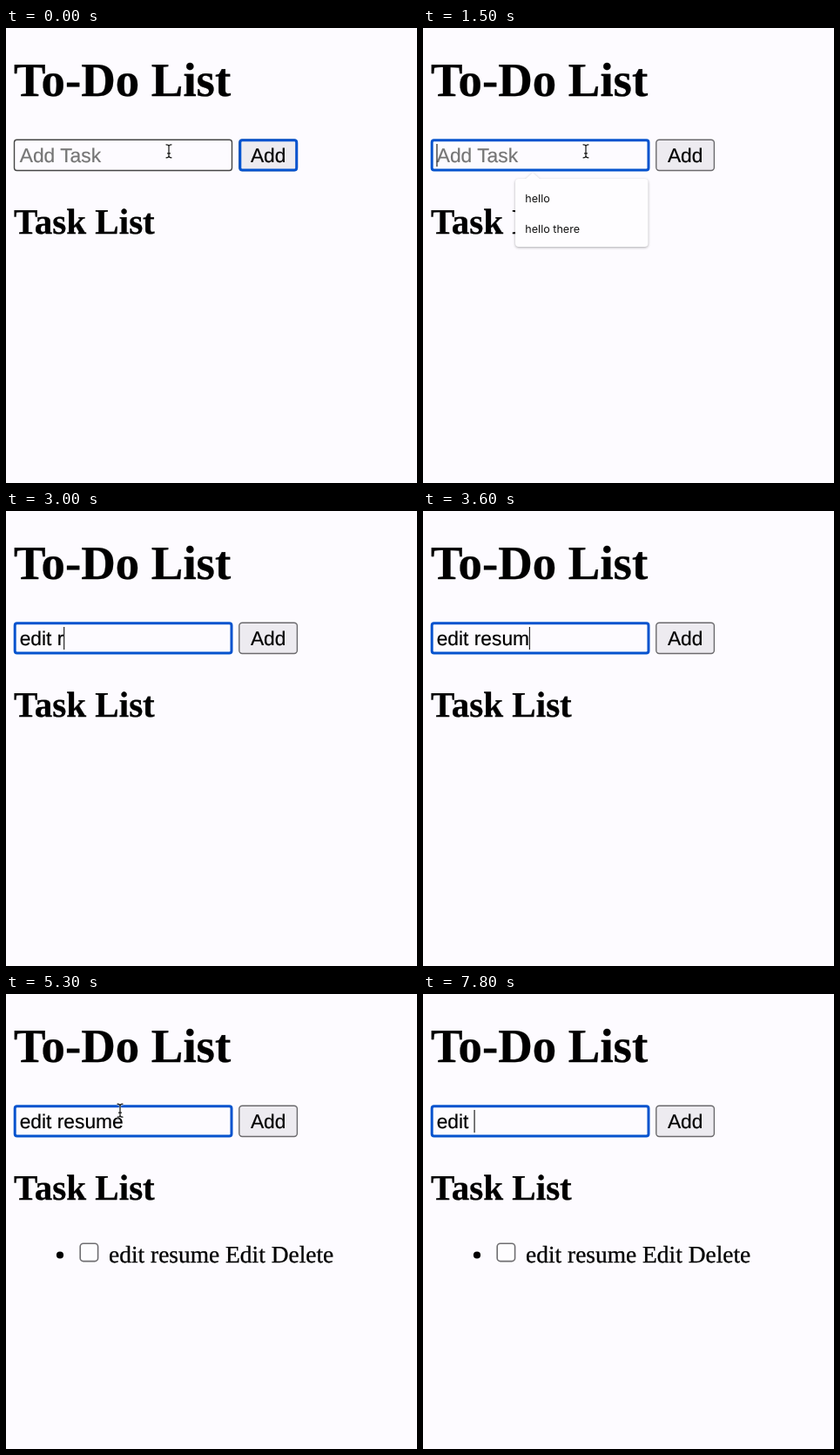
These frames come from a looping animation (472 px wide and 522 px high, 8 s). An HTML page:

```html
<!DOCTYPE html>
<html lang="en">
<head>
<meta charset="utf-8">
<title>To-Do List</title>
<style>
  html, body { margin: 0; width: 100%; height: 100%; overflow: hidden; background: #fdfbff; }
  svg { display: block; width: 100%; height: 100%; }
  text { white-space: pre; text-rendering: geometricPrecision; }
  .serif { font-family: "Liberation Serif", serif; stroke: #000; stroke-width: .3; }
  .sans { font: 22.8px "Liberation Sans", sans-serif; stroke: currentColor; stroke-width: .2; }
  .menu { font: 12.6px Inter, sans-serif; fill: #111; }
  .bold { font-weight: bold; }
  .ring { fill: none; stroke: #0553ce; stroke-width: 3; }
  #placeholder { color: #757575; fill: #757575; }
  #popup path { fill: #fefdff; filter: drop-shadow(0 1px 1.5px rgba(0, 0, 0, .32)); }
  #pointer { fill: none; stroke-linecap: round; }
</style>
</head>
<body>
<svg viewBox="0 0 472 522">
  <defs>
    <path id="beam" d="M-3-7.5Q0-7.5 0-5.5Q0-7.5 3-7.5M0-5.5V5.5M-3 7.5Q0 7.5 0 5.5Q0 7.5 3 7.5M-1.5 2.5H1.5"/>
  </defs>

  <text class="serif bold" x="9" y="77.7" font-size="54.8">To-Do List</text>
  <text class="serif bold" x="9" y="236" font-size="41.1">Task List</text>

  <rect id="inputBorder" x="9.5" y="128.2" width="250" height="35.3" rx="3" fill="none" stroke="#454545" stroke-width="1.4"/>
  <rect id="inputRing" class="ring" x="10.2" y="128.8" width="248.8" height="34.3" rx="2.5"/>
  <text id="placeholder" class="sans" x="15.7" y="154">Add Task</text>
  <text id="value" class="sans" x="15.7" y="154"></text>
  <rect id="caret" y="133" width="1.2" height="26" fill="#222"/>

  <rect x="267.8" y="128.2" width="66.6" height="35.3" rx="3.5" fill="#edebf0" stroke="#6b6a6d" stroke-width="1.4"/>
  <rect id="buttonRing" class="ring" x="268.8" y="128.8" width="64.9" height="34.3" rx="2.5"/>
  <text class="sans" x="301.2" y="154" text-anchor="middle">Add</text>

  <g id="item">
    <circle cx="62" cy="299.5" r="4.1"/>
    <rect x="85.2" y="286.2" width="20.4" height="20.4" rx="3.6" fill="#fefdff" stroke="#6f6e71" stroke-width="1.6"/>
    <text class="serif" x="118" y="308" font-size="27.45">edit resume Edit Delete</text>
  </g>

  <g id="popup">
    <path d="M110 173H118L126 166L134 173H254.5a4 4 0 0 1 4 4V247a4 4 0 0 1-4 4H110a4 4 0 0 1-4-4V177a4 4 0 0 1 4-4Z"/>
    <text class="menu" x="117.3" y="199.7">hello</text>
    <text class="menu" x="117.3" y="234.7">hello there</text>
  </g>

  <g id="pointer">
    <use href="#beam" stroke="#fff" stroke-width="2.4" opacity=".7"/>
    <use href="#beam" stroke="#111" stroke-width="1.2"/>
  </g>
</svg>
<script>
const LOOP = 8000, STEP = 100, BLINK = 500;
const FOCUS = 500, TYPING = 1600, ADDED = 4400, POINTER_BACK = 4800, DELETING = 7200;
const TASK = "edit resume", INPUT_X = 15.7;

// Evenly paced runs of key presses
const bursts = [
  { start: 1630, pace: 133, keys: 4, change: 1 },
  { start: 2300, pace: 0, keys: 1, change: 1 },
  { start: 2900, pace: 180, keys: 6, change: 1 },
  { start: 7210, pace: 108, keys: 6, change: -1 }
];

const el = id => document.getElementById(id);
const show = (id, on) => el(id).style.display = on ? "" : "none";
const snap = t => Math.round(t / STEP) * STEP;
const progress = (t, from, to) => Math.min(1, Math.max(0, (t - from) / (to - from)));

const ruler = document.createElement("canvas").getContext("2d");
ruler.font = '22.8px "Liberation Sans", sans-serif';

function fieldAt(t) {
  let length = 0, lastKey = FOCUS;
  for (const { start, pace, keys, change } of bursts) {
    for (let i = 0; i < keys; i++) {
      const time = snap(start + i * pace);
      if (time <= t) {
        length += change;
        lastKey = time;
      }
    }
  }
  return { typed: TASK.slice(0, length), lastKey };
}

// The pointer swings up over the heading, back to the field, then drifts right
function pointerAt(t) {
  const swing = progress(t, POINTER_BACK, 5300);
  const drift = progress(t, 5700, 6600);
  return [
    187 - 56 * swing + 25.4 * drift,
    141.3 - 7.6 * swing + 18 * drift - 70 * Math.sin(Math.PI * swing)
  ];
}

function draw(t) {
  const { typed, lastKey } = fieldAt(t);
  const focused = t >= FOCUS;

  el("value").textContent = typed;
  el("caret").setAttribute("x", INPUT_X + ruler.measureText(typed).width - 0.3);
  show("caret", focused && (t - lastKey) % (2 * BLINK) < BLINK);
  show("placeholder", !typed);
  show("inputBorder", !focused);
  show("inputRing", focused);
  show("buttonRing", !focused);
  show("popup", focused && t < TYPING);
  show("item", t >= ADDED);
  show("pointer", t < TYPING || (t >= POINTER_BACK && t < DELETING));
  el("pointer").setAttribute("transform", `translate(${pointerAt(t)})`);
}

const start = performance.now();
function tick() {
  const t = (performance.now() - start) % LOOP;
  draw(Math.floor(t / STEP) * STEP);
  requestAnimationFrame(tick);
}
tick();
</script>
</body>
</html>
```
